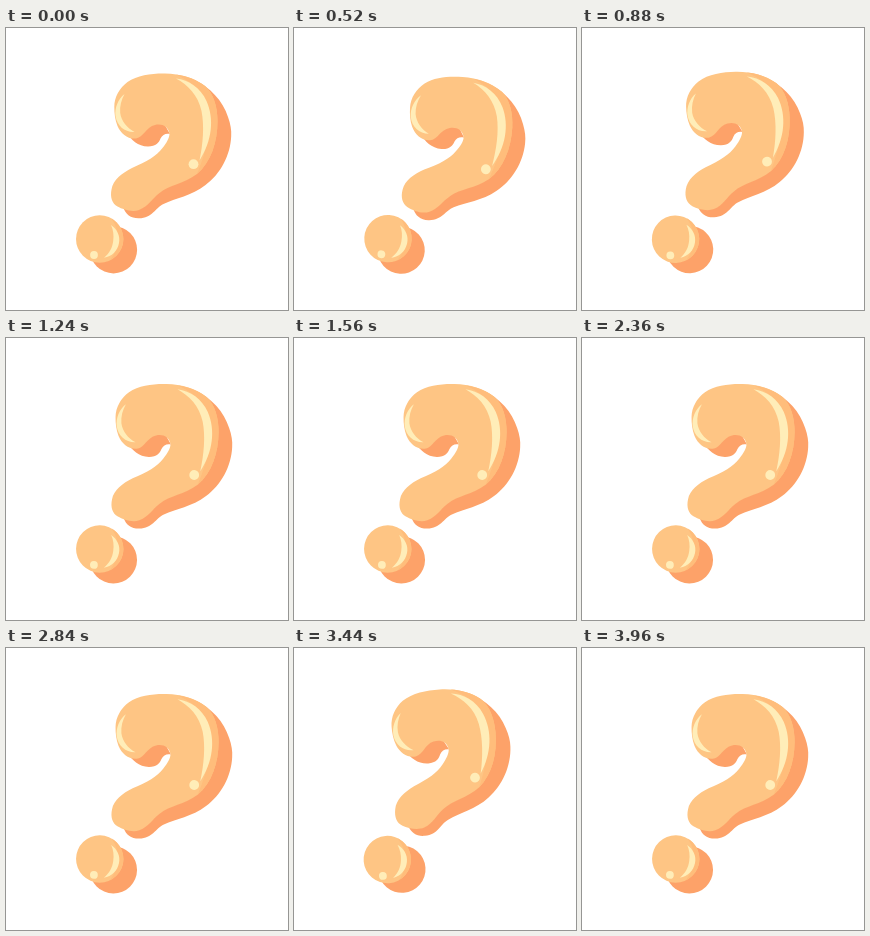
An HTML page that plays this animation: 282 px wide and 282 px high, repeating every 4 s.

```html
<!DOCTYPE html>
<html lang="en">
<head>
<meta charset="utf-8">
<title>Swinging question mark</title>
<style>
  html, body { margin: 0; width: 100%; height: 100%; overflow: hidden; background: #fff; }
  svg { display: block; width: 100%; height: 100%; }
  .face { fill: #fec584; }
  .rim { fill: #ffbd7b; }
  .side { fill: #fda269; }
  .shine { fill: #ffedb8; }
</style>
</head>
<body>
<svg viewBox="0 0 282 282">
  <g id="mark">
    <g class="side">
      <path d="M188 52C204 59 217 73 222 89C224.500 96 225.600 102 225.200 108C224.500 127 214.500 146 199.500 157C185.500 168 169.500 170 157.500 176C149 180 146.500 190 133 190.300C125 190.500 119.500 186.500 117 179L150 155L190 120Z"/>
      <path d="M120 104C125 112 132 118.300 142 118.500C150 118.500 153 114.500 154.500 110.500C156.500 106.500 160 105 164 106L156 92Z"/>
      <circle cx="107.500" cy="221.800" r="23.600"/>
    </g>
    <g class="face">
      <path d="M108.300 79C108.300 69 113.500 60 121.500 54C131.500 47 146 45.300 159 45.500C174 45.700 189 50 199 58C207.500 65 211.500 79 211.500 93C211.500 114 205 134 191 146C178 156 163 157 153.500 165C145.500 171 143 178 133 182C126 184.500 117 181.500 111.500 178.500C106 175.500 104 169 105.500 161.500C107 152 116 145 126 140C141 133.500 150 128.500 156.500 120C160.500 115 163.500 110 163.500 105.500C162 98 156 95.500 149 97C140 99 138 109 130 110.500C122 111.500 115 106 111.500 98C109 92 108.300 85 108.300 79Z"/>
      <circle cx="93.700" cy="211" r="23.700"/>
    </g>
    <g class="rim">
      <path d="M170 46.500C181 48 191 52 199 58C207.500 65 211.500 79 211.500 93C211.500 114 205 134 191 146C201 122 208 94 200 73C194 60 182 52 170 46.500Z"/>
      <path d="M105.500 190.500C113 195 117.400 203 117.400 211C117.400 220 112 228 104 232.300C112 222 116 206 105.500 190.500Z"/>
    </g>
    <g class="shine">
      <path d="M118.500 66C112 71 108.600 80 109.500 88C111 98 119 104.500 128.500 104C121 100 115.300 93 114.200 85C113.600 78 115.300 72 118.500 66Z"/>
      <path d="M170 50.500C183 52 194.500 60 200.500 73C208.500 91 206 113 193.500 132.500C197 116 198.500 98 195.500 83C192 67 182 57 170 50.500Z"/>
      <circle cx="187.500" cy="136.200" r="4.900"/>
      <path d="M105 197C111 201 114.500 208 113 215C111.500 223 106 228.500 98 229.800C103.500 225 106.300 220 107.200 213C108 207 107.300 202 105 197Z"/>
      <circle cx="88" cy="227" r="3.900"/>
    </g>
  </g>
</svg>
<script>
  const mark = document.getElementById('mark');
  const PERIOD = 800, STEP = 40;
  const stops = [0, -5, 0, 5, 0];
  const ease = u => u * u * (3 - 2 * u);

  // Eased swing between rest and each side, four quarters per period.
  function angle(ms) {
    const q = (ms % PERIOD) / PERIOD * 4;
    const i = Math.floor(q);
    return stops[i] + (stops[i + 1] - stops[i]) * ease(q - i);
  }

  function draw(ms) {
    const t = Math.floor(ms / STEP) * STEP;
    mark.setAttribute('transform', `rotate(${angle(t)} 100.500 216)`);
  }

  const start = performance.now();
  function tick() {
    draw(performance.now() - start);
    requestAnimationFrame(tick);
  }
  tick();
</script>
</body>
</html>
```
